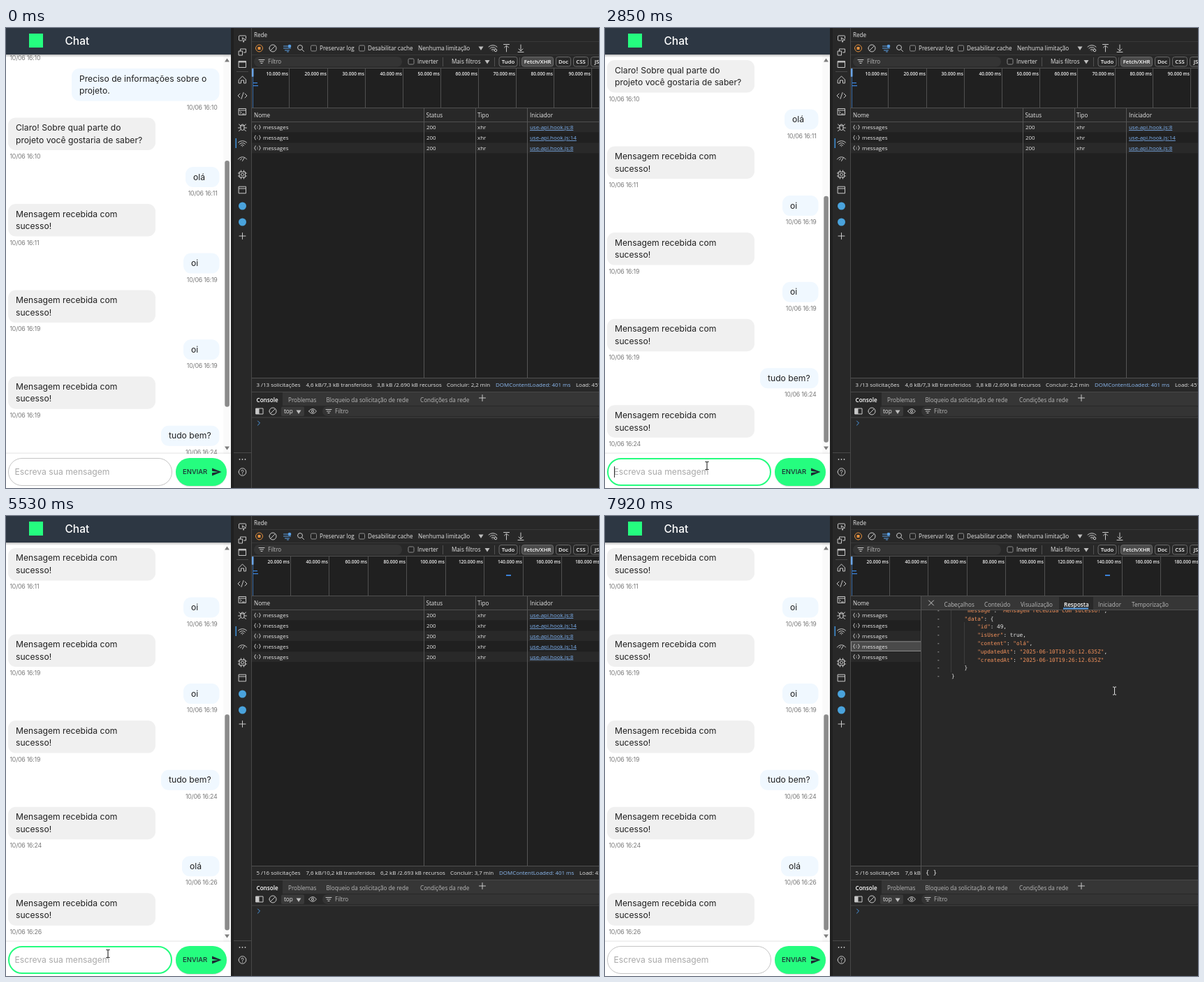
An HTML page for the animation above (7.99 s loop, 849 by 659 pixels).

```html
<!DOCTYPE html>
<html lang="pt-BR">
<head>
<meta charset="utf-8">
<title>Chat</title>
<style>
html, body { margin: 0; width: 100%; height: 100%; overflow: hidden; background: #282828; }
svg { display: block; width: 849px; height: 659px; }
text { font: 8.15px "Open Sans", "Noto Sans", sans-serif; fill: #e6e6e6; white-space: pre; }
.chat text { font: 12.15px Inter, sans-serif; fill: #212121; }
.chat .time { font-size: 8.8px; letter-spacing: -.25px; fill: #7b7b7b; }
.chat .title { font-size: 15.5px; font-weight: 500; fill: #fff; }
.chat .btn { font-size: 9.5px; font-weight: 500; fill: #1d2b33; }
.chat .hint { fill: #a9a9a9; }
.small text { font-size: 7.95px; }
.tick { font-size: 6.5px; font-weight: 600; fill: #f2f2f2; }
.dim { fill: #b9b9b9; }
.link { fill: #7fb4f5; text-decoration: underline; }
.bold { font-weight: 600; fill: #fff; }
.code text { font: 7.72px "DejaVu Sans Mono", monospace; }
.key { fill: #f5935c; }
.ico { fill: none; stroke: #c8c8c8; stroke-width: 1; stroke-linecap: round; stroke-linejoin: round; }
</style>
</head>
<body>
<svg id="stage" viewBox="0 0 849 659" xmlns="http://www.w3.org/2000/svg"></svg>
<script>
const LOOP = 7990, GREEN = '#25fd7f', LINE = '#505050';
const CLICK = 7125, SEND = 5195, REPLY = 5330, FOCUS = 1785;

const rect = (x, y, w, h, fill, more = '') =>
  `<rect x="${x}" y="${y}" width="${w}" height="${h}" fill="${fill}" ${more}/>`;
const text = (x, y, s, cls = '', more = '') => `<text x="${x}" y="${y}" class="${cls}" ${more}>${s}</text>`;
const icon = (x, y, d, more = '') => `<path class="ico" transform="translate(${x} ${y})" d="${d}" ${more}/>`;
const group = (id, body, more = '') => `<g id="${id}" ${more}>${body}</g>`;
const vline = (x, y1, y2, c = LINE) => rect(x, y1, 1, y2 - y1, c);
const hline = (x1, x2, y, c = LINE) => rect(x1, y, x2 - x1, 1, c);
const ring = r => `M${-r} 0a${r} ${r} 0 1 0 ${2 * r} 0a${r} ${r} 0 1 0 ${-2 * r} 0`;
const box = (w, h) => `M${-w} ${-h}h${2 * w}v${2 * h}h${-2 * w}z`;
const down = (x, y) => `<path d="M${x - 3.5} ${y - 2.5}h7l-3.5 5.5z" fill="#bdbdbd"/>`;
const check = (x, y) => rect(x - 4, y - 4, 8, 8, '#242424', 'rx="1.5" stroke="#8b8b8b"');

// ---- chat
const OK = ['Mensagem recebida com', 'sucesso!'];
const messages = [
  { y: 58, x: 94, lines: ['Preciso de informações sobre o', 'projeto.'], time: '16:10' },
  { y: 128.4, bot: 1, lines: ['Claro! Sobre qual parte do', 'projeto você gostaria de saber?'], time: '16:10' },
  { y: 199, x: 257, lines: ['olá'], time: '16:11' },
  { y: 252, bot: 1, lines: OK, time: '16:11' },
  { y: 322.6, x: 254, lines: ['oi'], time: '16:19' },
  { y: 375.6, bot: 1, lines: OK, time: '16:19' },
  { y: 446.2, x: 254, lines: ['oi'], time: '16:19' },
  { y: 499.2, bot: 1, lines: OK, time: '16:19' },
  { y: 569.8, x: 222, lines: ['tudo bem?'], time: '16:24' },
  { y: 622.8, bot: 1, lines: OK, time: '16:24' },
  { y: 693.4, x: 252, lines: ['olá'], time: '16:26', id: 'sent' },
  { y: 746.4, bot: 1, lines: OK, time: '16:26', id: 'reply' }
];

function bubble({ y, x = 3, bot, lines, time, id = '' }) {
  const h = lines.length > 1 ? 46.5 : 29, w = bot ? 211 : 305.5 - x;
  return group(id, rect(x, y, w, h, bot ? '#f0f0f0' : '#f0f8ff', 'rx="11"') +
    lines.map((s, i) => text(x + 11, y + 18.6 + i * 17.6, s)).join('') +
    text(bot ? 5.5 : 302.5, y + h + 12.1, '10/06 ' + time, 'time', bot ? '' : 'text-anchor="end"'));
}

const chat = `<g class="chat">
  ${rect(0, 0, 322, 659, '#fff')}
  <g clip-path="url(#view)">${group('list', text(5.5, 45.8, '10/06 16:10', 'time') + messages.map(bubble).join(''))}</g>
  ${rect(311.5, 38, 10.5, 572, '#fafafa')}
  <path d="M313 48.5h7l-3.5-5zM313 604.5" fill="#7d7d7d"/><path d="M313 599.5h7l-3.5 5z" fill="#7d7d7d"/>
  ${rect(313.3, 190, 6.6, 353, '#8b8b8b', 'id="thumb" rx="3.3"')}
  ${rect(0, 38, 322, 4, 'url(#shade)')}
  ${rect(0, 0, 322, 38, '#2d3743')}
  ${rect(33, 8, 20, 20, GREEN)}
  ${text(84.5, 23.5, 'Chat', 'title')}
  ${rect(0, 607, 322, 3, 'url(#lift)')}
  ${rect(0, 610, 322, 49, '#fff')}
  ${rect(0, 0, 0, 0, '#fff', 'id="pill"')}
  ${text(12.5, 640, 'Escreva sua mensagem', 'hint', 'id="hint"')}
  ${text(12.5, 640, '', '', 'id="typed" style="fill:#444"')}
  ${rect(13, 628, 1, 16, '#333', 'id="caret"')}
  ${rect(243, 617, 73, 40, '#000', 'rx="20" opacity=".14"')}
  ${rect(243, 616, 73, 40, GREEN, 'rx="20"')}
  ${text(253, 639.4, 'ENVIAR', 'btn')}
  <path d="M295 630.5l13.5 5.5-13.5 5.5v-4.3l9-1.2-9-1.2z" fill="#1d2b33"/>
</g>`;

// ---- devtools
const gear = ring(2) + 'M-4-4h8v8h-8zM-2-6v2M2-6v2M-2 4v2M2 4v2M-6-2h2M-6 2h2M4-2h2M4 2h2';
const slash = ring(5) + 'M-3.5 3.5l7-7';
const wifi = 'M-6-1a8.5 8.5 0 0 1 12 0M-4 1.2a5.6 5.6 0 0 1 8 0M-2 3.2a2.8 2.8 0 0 1 4 0M0 4.6v.2';
const sideIcons = [
  [15, 'M-1 3h-3a1 1 0 0 1-1-1v-5a1 1 0 0 1 1-1h8a1 1 0 0 1 1 1v3M0-1l5 3-2.3.6-1 2.4z'],
  [34, 'M-3-1v-3h8v5h-3M-5-1h5v6h-5z'],
  [52, box(5, 4.5) + 'M-5-3h10M-5-3.8h10'],
  [74, 'M-5 0l5-5 5 5v5h-3v-4h-4v4h-3z'],
  [97, 'M-3.5-3l-3 3 3 3M3.5-3l3 3-3 3M1.5-4.5l-3 9'],
  [120, box(5, 4.5) + 'M-5-2h10M-3 0l1.6 1.3-1.6 1.3M0 3h3'],
  [142, 'M-2.5-2h5v4a2.5 2.5 0 0 1-5 0zM-2-2a2 2 0 0 1 4 0M-5-4l2.5 2M5-4l-2.5 2M-6 1h3.5M6 1h-3.5M-5 5.5l2.5-2M5 5.5l-2.5-2'],
  [165, wifi],
  [187, 'M-6 1a7 7 0 0 1 12 0M-3 2a4 4 0 0 1 2-2M0 3.5l3-5'],
  [210, gear],
  [232, box(5, 4.8) + 'M-5-2h10'],
  [298, 'M-4.5 0h9M0-4.5v9'],
  [636, ring(5.3) + 'M-1.5-1.2a1.5 1.5 0 1 1 2.2 1.3q-.7.4-.7 1.2M0 3v.2']
];
const side = rect(322, 0, 4, 659, '#202020') + rect(326, 0, 25, 659, '#282828') +
  hline(330, 347, 62, '#484848') + hline(326, 351, 608, '#484848') + vline(351, 0, 659, '#484848') +
  rect(328.5, 158, 1.5, 14, '#3f8fd6') +
  sideIcons.map(([y, d]) => icon(338.5, y, d)).join('') +
  [255, 278].map(y => `<circle cx="338.5" cy="${y}" r="5.5" fill="#4aa3dc"/>`).join('') +
  [-4, 0, 4].map(d => `<circle cx="${338.5 + d}" cy="618" r=".9" fill="#c8c8c8"/>`).join('');

const funnel = 'M-4-2.5h8M-2.5 0h5M-1 2.5h2';
const chip = (x, w, s, on) => rect(x, 41.5, w, 13.5, on ? '#4b4b4b' : '#282828', 'rx="3" stroke="#6a6a6a"') +
  text(x + w / 2, 51.3, s, 'bold', 'text-anchor="middle" style="font-size:7.7px"');

const tools = rect(352, 0, 497, 57, '#282828') + text(355, 12.5, 'Rede') +
  hline(352, 849, 19, '#383838') + hline(352, 849, 38, '#383838') +
  icon(362.5, 29, ring(5), 'style="stroke:#e8923e"') + rect(360.5, 27, 4, 4, '#e8923e') +
  icon(382, 29, slash) +
  icon(402.5, 29, 'M-5-3h6M-5 0h10M-3 3h6M0 5h2', 'style="stroke:#5aa0e6"') +
  `<circle cx="406" cy="26" r="2.3" fill="#5aa0e6"/>` +
  icon(421, 28, ring(3.5) + 'M2.6 2.6l3 3') +
  check(440.5, 29) + text(449, 32, 'Preservar log') +
  check(509.5, 29) + text(518, 32, 'Desabilitar cache') +
  text(590, 32, 'Nenhuma limitação') + down(680, 29) +
  icon(697, 28, wifi) + icon(701, 32, ring(1.8)) +
  icon(716.5, 29, 'M0 5v-8M-3-1l3-3 3 3M-4-5.5h8') + icon(737, 29, 'M0-5v8M-3 1l3 3 3-3M-4 5.5h8') +
  rect(355, 41, 212, 14.5, '#343434', 'rx="7"') + icon(366, 48, funnel) + text(375, 51.3, 'Filtro', 'dim') +
  check(580, 48) + text(589, 51.3, 'Inverter') + vline(625, 42, 55) +
  text(638, 51.3, 'Mais filtros', '', 'style="font-weight:500"') + down(689, 48.5) + vline(699, 42, 55) +
  chip(706, 26, 'Tudo') + vline(735, 42, 55) + chip(738.5, 45, 'Fetch/XHR', 1) + chip(787.5, 21, 'Doc') +
  chip(812.5, 21, 'CSS') + chip(837.5, 17, 'JS');

function graph(id, gap, step) {
  let s = '';
  for (let i = 1; i < 10; i++) {
    const x = Math.round(351.3 + i * gap);
    s += vline(x, 58, 114) + text(x - 1, 67.5, i * step + '.000 ms', 'tick', 'text-anchor="end"');
  }
  return group(id, s);
}
const timeline = rect(352, 57, 497, 58, '#202020') + hline(352, 849, 57) + graph('early', 54.12, 10) +
  group('late', graph('', 55.5, 20) + rect(716, 84, 7, 2, '#3b82d8')) +
  vline(353, 58, 114, '#3b6ea8') + rect(352, 58, 2.5, 12, '#6aa5e8', 'rx="1"') +
  rect(354, 78, 6, 1.3, '#3b82d8') + rect(354, 82, 7, 1.3, '#3b82d8');

const rowTop = i => 134.8 + i * 14.85;
function row(i) {
  const y = rowTop(i);
  return group('row' + i, rect(352, y, 497, 14.85, i % 2 ? '#202020' : '#292929'));
}
function rowText(i) {
  const y = rowTop(i) + 10.4;
  return group('cell' + i, icon(360, y - 3, 'M-2.5-3q-1 0-1 1.5t-1 1.5q1 0 1 1.5t1 1.5M2.5-3q1 0 1 1.5t1 1.5q-1 0-1 1.5t-1 1.5M0-1v.2M0 1v.4') +
    text(368, y, 'messages') + text(602, y, '200') + text(675, y, 'xhr') +
    text(750, y, 'use-api.hook.js:' + (i % 2 ? 14 : 8), 'link'), 'class="small"');
}
const rowIds = [0, 1, 2, 3, 4];
const statX = [358.5, 429.5, 531, 631, 701, 816];
const stats = (id, shift, list) => group(id, list.map((s, i) =>
  text(statX[i] + (i > 1 ? shift : 0), 514.3, s, '', i === 4 ? 'style="fill:#8ebcf4"' : '')).join(''), 'class="small"');

const table = rect(352, 115, 497, 386, '#202020') + rowIds.map(row).join('') +
  rect(352, 0, 497, 14.85, '#383838', 'id="hover"') +
  rect(352.5, rowTop(3) + .5, 100, 13.6, '#4a4a4a', 'id="picked" stroke="#8d8d8d"') +
  rowIds.map(rowText).join('') +
  rect(352, 115, 497, 19, '#282828') + hline(352, 849, 114) + hline(352, 849, 134) +
  [['Nome', 355], ['Status', 601.5], ['Tipo', 675], ['Iniciador', 750]].map(([s, x]) => text(x, 128, s)).join('') +
  [598, 672, 746].map(x => vline(x, 115, 501, '#555')).join('') +
  rect(352, 501, 497, 20, '#282828') + hline(352, 849, 501) +
  stats('before', 0, ['3 /13 solicitações', '4,6 kB/7,3 kB transferidos', '3,8 kB /2.690 kB recursos',
    'Concluir: 2,2 min', 'DOMContentLoaded: 401 ms', 'Load: 451 ms']) +
  stats('after', 5, ['5 /16 solicitações', '7,6 kB/10,2 kB transferidos', '6,2 kB /2.693 kB recursos',
    'Concluir: 3,7 min', 'DOMContentLoaded: 401 ms', 'Load: 451 ms']);

const json = [
  [1, '"message"', '"Mensagem recebida com sucesso!",'], [1, '"data"', '{'], [2, '"id"', '49,'],
  [2, '"isUser"', 'true,'], [2, '"content"', '"olá",'], [2, '"updatedAt"', '"2025-06-10T19:26:12.635Z",'],
  [2, '"createdAt"', '"2025-06-10T19:26:12.635Z"'], [1, '', '}'], [0, '', '}']
];
function codeLine([depth, key, val], i) {
  const y = 137.7 + i * 11.8, x = 496 + depth * 18.6, str = val[0] === '"';
  const body = str ? `<tspan class="key">${val.replace(/,$/, '')}</tspan>${val.endsWith(',') ? ',' : ''}` : val;
  return text(475, y, '-') + text(x, y, key ? `<tspan class="key">${key}</tspan>: ${body}` : body);
}
const tabs = [['Cabeçalhos', 485.5], ['Conteúdo', 543], ['Visualização', 595], ['Resposta', 657], ['Iniciador', 706], ['Temporização', 754]];
const panel = group('panel', rect(453, 115, 396, 406, '#282828') +
  vline(495, 134, 224, '#3d3d3d') + vline(514, 152, 212, '#3d3d3d') +
  `<g class="code">${json.map(codeLine).join('')}</g>` +
  rect(453, 115, 396, 19, '#363636') + rect(650, 116, 49, 18, '#282828') + rect(656, 131.5, 36, 2, '#5aa0e6') +
  icon(467, 124.5, 'M-3.5-3.5l7 7M3.5-3.5l-7 7') +
  tabs.map(([s, x]) => text(x, 129.6, s, s === 'Resposta' ? 'bold' : 'dim')).join('') +
  hline(453, 849, 134) + hline(453, 849, 501) + vline(452, 115, 521, '#555') +
  `<g class="code">${text(459, 514, '{ }', '', 'style="font-size:9px"')}</g>`);

const drawer = rect(352, 521, 497, 20, '#363636') + rect(352, 522, 44, 19, '#282828') + hline(352, 849, 521, '#484848') +
  text(358.5, 535.5, 'Console', 'bold') +
  [['Problemas', 404], ['Bloqueio da solicitação de rede', 458.5], ['Condições da rede', 593]]
    .map(([s, x]) => text(x, 535.5, s, 'dim')).join('') +
  icon(682, 530, 'M-4.5 0h9M0-4.5v9') +
  rect(352, 541, 497, 118, '#282828') + hline(352, 849, 557.5, '#444') +
  icon(363, 549, box(5, 4)) + rect(358, 545, 4.5, 8, '#c8c8c8') + icon(382, 549, slash) +
  rect(394, 542.5, 33, 13.5, '#3a3a3a', 'rx="2"') + text(398, 552.3, 'top') + down(419, 550) +
  icon(439, 549, 'M-5.5 0q5.5-7 11 0q-5.5 7-11 0' + ring(1.6)) +
  rect(453, 542, 400, 14, '#343434', 'rx="7"') + icon(462, 549, funnel) + text(471, 552.3, 'Filtro', 'dim') +
  icon(362, 566, 'M-1.5-3l3 3-3 3', 'style="stroke:#4a9be8"');

document.getElementById('stage').innerHTML = `<defs>
  <clipPath id="view"><rect x="0" y="38" width="311.5" height="572"/></clipPath>
  <linearGradient id="shade" x2="0" y2="1"><stop stop-opacity=".26"/><stop offset="1" stop-opacity="0"/></linearGradient>
  <linearGradient id="lift" x2="0" y2="1"><stop stop-opacity="0"/><stop offset="1" stop-opacity=".08"/></linearGradient>
  </defs>` + rect(0, 0, 849, 659, '#282828') + chat + side + tools + timeline + table + panel + drawer +
  group('arrow', '<path d="M0 0v11.2l2.6-2.3 1.8 4 1.9-.9-1.8-3.8h3.4z" fill="#fff" stroke="#111" stroke-width=".9"/>') +
  group('beam', '<path d="M-2.5-5.5h2l.5.6.5-.6h2M0-5v10M-2.5 5.5h2l.5-.6.5.6h2" fill="none"/>');

// ---- motion
const el = id => document.getElementById(id);
const show = (id, on) => el(id).setAttribute('display', on ? 'inline' : 'none');
const set = (id, attrs) => { for (const k in attrs) el(id).setAttribute(k, attrs[k]); };

function along(keys, t) {
  let i = 0;
  while (i < keys.length - 1 && t >= keys[i + 1][0]) i++;
  const a = keys[i], b = keys[i + 1];
  if (!b || t <= a[0]) return a.slice(1);
  const u = (t - a[0]) / (b[0] - a[0]), e = u * u * (3 - 2 * u);
  return a.slice(1).map((v, k) => v + (b[k + 1] - v) * e);
}

const scroll = [[1080, 0], [1220, 22.5], [1430, 82.5], [SEND, 82.5], [5320, 135.5], [REPLY, 135.5], [5490, 206.1]];
const mouse = [
  [300, 348, 654], [560, 228, 640], [1080, 207, 524], [1220, 207, 518], [1270, 207, 518], [1570, 153, 626.5],
  [1780, 146, 627], [5870, 146, 627], [6700, 398, 214], [6770, 398, 213], [7060, 392, 189], [7470, 392, 189],
  [7650, 415, 195], [7740, 415, 195], [7915, 729.5, 250.5]
];
const typing = [[0, '', 13], [3665, 'o', 20], [3790, 'ol', 22.5], [4595, 'olá', 30], [SEND, '', 13]];
const blinks = [FOCUS, 3665, 3795, 4597];

// The border lies inside the field's edge at either width.
function drawPill(color, line) {
  set('pill', {
    x: 3 + line / 2, y: 616 + line / 2, width: 235 - line, height: 40 - line,
    rx: 20 - line / 2, stroke: color, 'stroke-width': line
  });
}

function draw(t) {
  const [off] = along(scroll, t);
  const k = 541 / (t < SEND ? 877 : t < REPLY ? 930 : 1001);
  set('list', { transform: `translate(0 ${-off})` });
  set('thumb', { y: 53 + (off + 222) * k, height: 572 * k });
  show('sent', t >= SEND);
  show('reply', t >= REPLY);

  const [x, y] = along(mouse, t), seen = t >= 310, opened = t >= CLICK;
  const inPill = x > 3 && x < 238 && y > 616 && y < 656;
  const focus = t >= FOCUS && t < CLICK;
  drawPill(focus ? GREEN : seen && inPill ? '#222' : '#c4c4c4', focus ? 2 : 1);

  const [, word, caretX] = typing.filter(s => t >= s[0]).pop();
  el('typed').textContent = word;
  show('hint', !word);
  const base = blinks.filter(b => t >= b).pop();
  show('caret', focus && Math.floor((t - base) / 533) % 2 === 0);
  set('caret', { x: caretX });

  const count = t < SEND ? 3 : t < REPLY ? 4 : 5;
  for (const i of rowIds) {
    show('row' + i, i < count);
    show('cell' + i, i < count);
  }
  show('early', t < SEND);
  show('late', t >= SEND);
  show('before', t < SEND);
  show('after', t >= SEND);
  show('panel', opened);
  show('picked', opened);

  const over = Math.floor((y - rowTop(0)) / 14.85);
  show('hover', seen && x > 352 && over >= 0 && over < count && !(opened && (over === 3 || x > 452)));
  set('hover', { y: rowTop(over) });

  const inCode = opened && x > 470;
  const beam = inPill || inCode, at = { transform: `translate(${x} ${y})` };
  show('beam', seen && beam);
  show('arrow', seen && !beam);
  set('beam', { ...at, stroke: inCode ? '#ddd' : '#111' });
  set('arrow', at);
}

const start = performance.now();
function tick(now) {
  draw(Math.max(0, now - start) % LOOP);
  requestAnimationFrame(tick);
}
draw(0);
requestAnimationFrame(tick);
</script>
</body>
</html>
```
